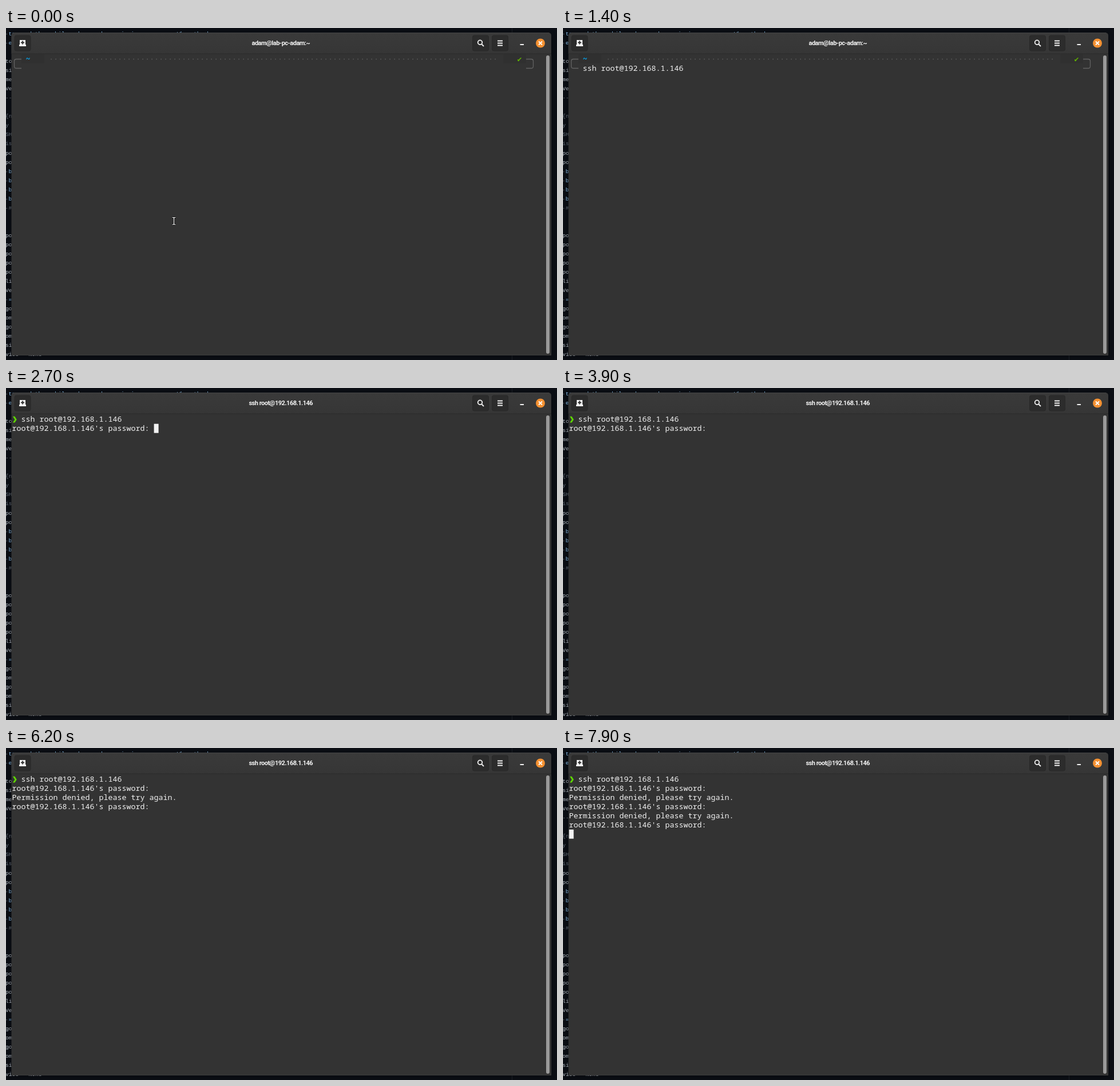
An HTML page that plays this animation: 963x581 px, repeating every 8000 ms.

```html
<!DOCTYPE html>
<html lang="en">
<head>
<meta charset="utf-8">
<title>Terminal</title>
<style>
  html, body { margin: 0; width: 100%; height: 100%; overflow: hidden; background: #0b0e14; }
  svg { display: block; width: 963px; height: 581px; }
  text { white-space: pre; }
  #editor text { font: 9.63px "Liberation Mono", monospace; fill: #b9c0c8; }
  #editor .dim { fill: #68717b; }
  #editor .blue { fill: #8fc6f2; }
  #title { font: bold 11px Roboto, sans-serif; letter-spacing: -.5px; fill: #f2f2f2; text-anchor: middle; }
  #screen text { font: 13.333px "Noto Sans Mono", monospace; fill: #f2f2f2; }
  #screen .tilde { fill: #00afff; font-weight: bold; }
  #screen .symbol { font-family: "DejaVu Sans Mono", monospace; }
  #screen .check { fill: #5faf00; }
  #screen #arrow { fill: #5fd700; stroke: #5fd700; stroke-width: 1.1; font-weight: bold; }
  .button { fill: #2c2c2c; stroke: #282828; }
  .line { fill: none; stroke: #f2f2f2; stroke-width: 1.8; }
  .frame { fill: none; stroke: #626262; stroke-width: 1.3; }
</style>
</head>
<body>
<svg viewBox="0 0 963 581">
  <defs>
    <linearGradient id="bar" x2="0" y2="1">
      <stop stop-color="#3a3a3a"/><stop offset="1" stop-color="#363636"/>
    </linearGradient>
    <filter id="shadow" x="-5%" y="-5%" width="110%" height="110%">
      <feGaussianBlur stdDeviation="4"/>
    </filter>
  </defs>

  <rect width="963" height="581" fill="#0b0e14"/>
  <path d="M884.5 0V581" stroke="#1c2027"/>
  <g id="editor"></g>

  <rect x="10" y="10" width="943" height="564" rx="6" filter="url(#shadow)" opacity=".35"/>
  <path d="M9.5 573V14q0-6 6-6H947q6 0 6 6V573z" fill="#333"/>
  <path d="M9.5 45V14q0-6 6-6H947q6 0 6 6V45z" fill="url(#bar)"/>
  <path d="M14 8.5H949" stroke="#444"/>
  <path d="M10 45H953" stroke="#2b2b2b"/>
  <path d="M10 572.5H953M952.5 46V572" stroke="#3c3c3c"/>
  <rect x="944" y="48" width="6" height="522" rx="3" fill="#999"/>

  <g class="button">
    <rect x="15" y="13" width="28" height="27" rx="3"/>
    <rect x="815.5" y="13" width="28" height="27" rx="3"/>
    <rect x="849.5" y="13" width="28" height="27" rx="3"/>
  </g>
  <path d="M24 21h10v8h1v3H23v-3h1z" fill="#f2f2f2"/>
  <path d="M29 22.500v6M26 25.500h6" stroke="#2c2c2c" stroke-width="1.800"/>
  <circle class="line" cx="828.500" cy="25.200" r="3.800"/>
  <path class="line" d="M831 28l4 4M859 22.500h9M859 26.500h9M859 30.500h9M898.500 29h6.500"/>
  <circle cx="934" cy="26.500" r="8" fill="#f49132"/>
  <path d="M931 23.500l6 6m0-6l-6 6" stroke="#fff" stroke-width="1.800"/>
  <text id="title" x="480.300" y="30"></text>

  <g id="screen">
    <g id="prompt">
      <path d="M27 46h40v16H27zM869 46h40v16h-40z" fill="#303030"/>
      <path class="frame" d="M27 54.500H18q-3.500 0-3.500 3.500v9q0 3.500 3.500 3.500H27M909 54.500h9q3.500 0 3.500 3.500v9q0 3.500-3.500 3.500h-9"/>
      <path d="M78.300 54.500H860" stroke="#5c5c5c" stroke-width="1.600" stroke-dasharray="1.600 6.400"/>
      <text class="tilde" x="34.600" y="59">~</text>
      <text class="symbol check" x="893.500" y="59">✔</text>
    </g>
    <text id="arrow" class="symbol" x="11.500" y="59">❯</text>
    <g id="lines"></g>
    <rect id="cursor" width="8" height="16" fill="#f2f2f2"/>
  </g>
  <g id="pointer" fill="none">
    <path d="M290 331.500h2.500l1 1 1-1h2.500M293.500 332v11.500M290 344h2.500l1-1 1 1h2.500" stroke="#111" stroke-width="3"/>
    <path d="M290.500 331.500h2l1 1 1-1h2M293.500 332v11.500M290.500 344h2l1-1 1 1h2" stroke="#fff" stroke-width="1.200"/>
  </g>
</svg>
<script>
const $ = id => document.getElementById(id);

function addText(parent, x, y, content, className = "") {
  const node = document.createElementNS("http://www.w3.org/2000/svg", "text");
  node.setAttribute("x", x);
  node.setAttribute("y", y);
  node.setAttribute("class", className);
  node.textContent = content;
  parent.append(node);
}

// Editor rows peeking out behind the window; a leading "." marks visible whitespace.
const rows = [". to send them while a key exchange is in progress.  When the key", ". e", "", "to", "si",
  "me", "Ve", "--", "", "{n", "y", "SH", "is", "po", "po", ". b", ". b", ". b", ". b", ". #", "", "",
  "po", "po", "po", "po", "po", "li", "Ve", ". =", "go", "om", "go", "om", "si", "vice = None"];
rows.forEach((row, i) => {
  const y = 13 + i * 16.04, dotted = row.startsWith(". ");
  const dim = (i > 6 && i < 13) || i === 19;
  if (dotted) addText($("editor"), -1.5, y, "·", "dim");
  addText($("editor"), dotted ? 4.5 : -1, y, dotted ? row.slice(2) : row, dim ? "dim" : dotted ? "blue" : "");
});

const command = "ssh root@192.168.1.146";
const password = "root@192.168.1.146's password: ";
const denied = "Permission denied, please try again.";
const output = [password, denied, password, denied, password];
const outputTimes = [1800, 4200, 4200, 6600, 6700];

// Each entry: start time, then cursor [column, row] or null when blinked off.
const cursorStates = [
  [0, null], [300, [3, 1]], [700, null], [800, [25, 1]], [1400, null],
  [1700, [0, 1]], [1800, [31, 1]], [2300, null], [2700, [31, 1]],
  [3300, [0, 2]], [3900, null], [4600, [31, 3]],
  [5700, [0, 4]], [6200, null], [6700, [31, 5]], [7900, [0, 6]]
];

const show = (id, visible) => $(id).style.display = visible ? "" : "none";
const column = c => 10.6 + 8 * c;
const baseline = r => 59 + 16 * r;

let lastKey;
function render(t) {
  const running = t >= 1700;
  const typed = t >= 700;
  const count = outputTimes.filter(time => t >= time).length;
  const cursor = cursorStates.findLast(([time]) => t >= time)[1];

  show("prompt", !running);
  show("arrow", running);
  show("pointer", t < 600);
  show("cursor", cursor);
  if (cursor) {
    $("cursor").setAttribute("x", column(cursor[0]));
    $("cursor").setAttribute("y", baseline(cursor[1]) - 12.3);
  }

  const key = `${running} ${typed} ${count}`;
  if (key === lastKey) return;
  lastKey = key;
  $("title").textContent = running ? command : "adam@lab-pc-adam:~";
  $("lines").replaceChildren();
  if (typed) addText($("lines"), column(running ? 2 : 3), baseline(running ? 0 : 1), command);
  output.slice(0, count).forEach((line, i) => addText($("lines"), column(0), baseline(i + 1), line));
}

const start = performance.now();
function tick() {
  render((performance.now() - start) % 8000);
  requestAnimationFrame(tick);
}
tick();
</script>
</body>
</html>
```
